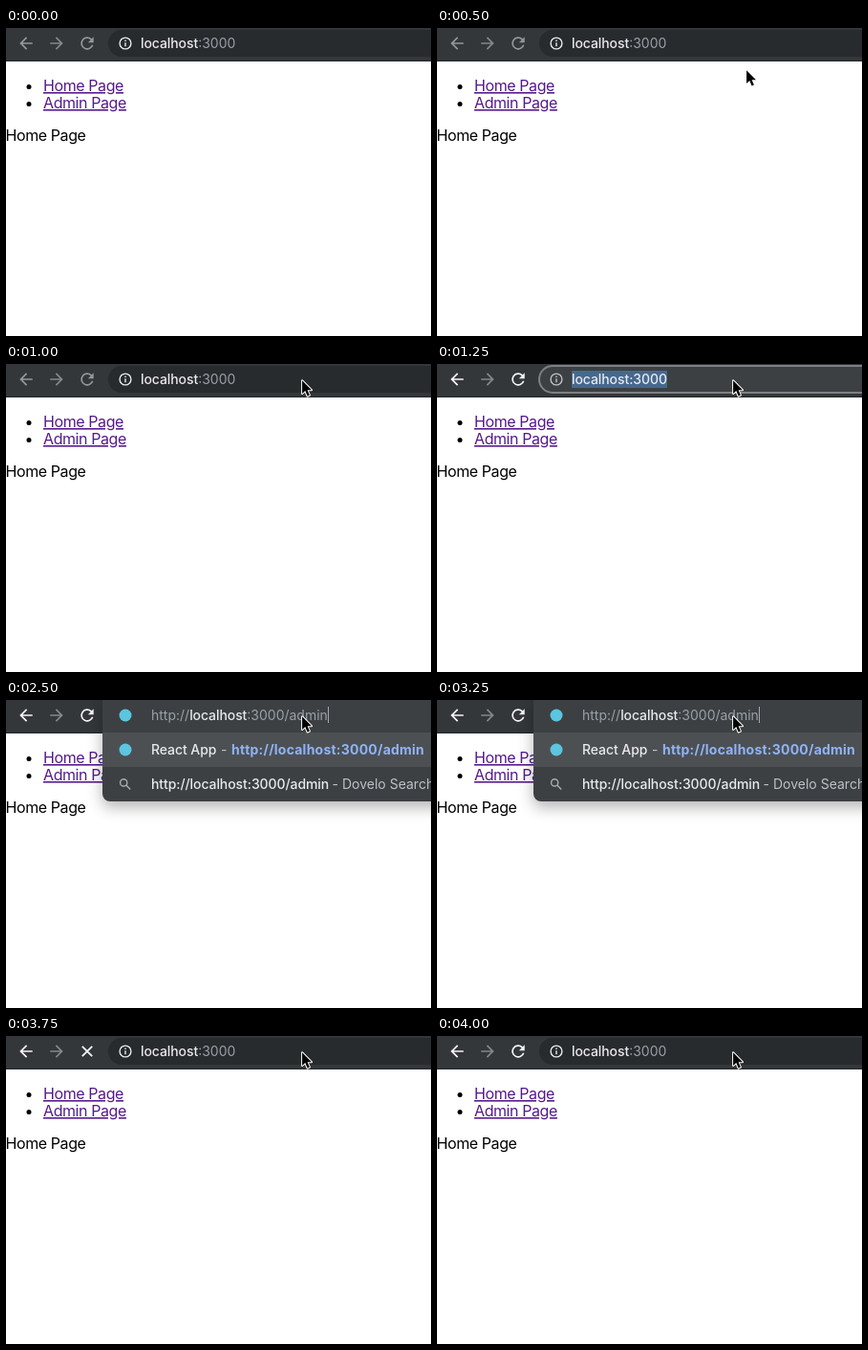
Animation, 445 px wide and 322 px high, one loop 5750 ms. Source, as an HTML page:

```html
<!DOCTYPE html>
<html lang="en">
<head>
<meta charset="utf-8">
<title>Address bar navigation</title>
<style>
  html, body { margin: 0; width: 100%; height: 100%; overflow: hidden; background: #fff; }
  .stage { position: relative; width: 100%; height: 100%; overflow: hidden; contain: strict; }
  svg { position: absolute; left: 0; top: 0; width: 445px; height: 322px; }
  text {
    font: 500 14px Inter, "Liberation Sans", sans-serif;
    letter-spacing: -0.08px;
    fill: #e8eaed;
    white-space: pre;
  }

  .page text { font-size: 16px; font-weight: 400; letter-spacing: -0.41px; fill: #000; }
  .page .link {
    fill: #551a8b;
    text-decoration: underline;
    text-decoration-thickness: 1px;
    text-underline-offset: 1px;
  }

  .icon { fill: currentColor; }
  .line { fill: none; stroke: currentColor; stroke-width: 1.4; }
  .white { fill: #e8eaed; font-weight: 500; letter-spacing: -0.08px; }
  .dim, .soft { font-weight: 400; letter-spacing: 0; }
  .dim { fill: #9aa0a6; }
  .soft { fill: #bdc1c6; }
  .match { font-weight: 700; letter-spacing: 0.23px; fill: #8fb3f7; }
  .favicon { fill: #5cc5e0; }

  .panel {
    position: absolute; left: 101px; top: -6px; width: 380px; height: 112px;
    border-radius: 8px; background: #3c4043;
    box-shadow: 0 6px 16px rgba(0, 0, 0, .3);
  }
  .panel div { position: absolute; top: 40px; width: 100%; height: 36px; background: #4d5053; }

  /* All state changes are hard cuts on a 250 ms beat, 23 beats per loop. */
  .nav, .reload, .stop, .rest, .focus, .open, .panel, .caret, .cursor {
    animation: 5750ms step-end infinite;
  }
  .nav { animation-name: nav; }
  .reload { animation-name: nav, reload; }
  .stop { animation-name: stop; }
  .rest { animation-name: rest; }
  .focus { animation-name: focus; }
  .open { animation-name: open; }
  .panel { animation-name: open, settle; }
  .caret { animation-name: caret; }
  .cursor { animation-name: cursor; }

  @keyframes nav {
    0% { color: #94969a; }
    21.739% { color: #f4f5f6; }
  }
  @keyframes reload {
    0% { visibility: visible; }
    65.217% { visibility: hidden; }
    69.565% { visibility: visible; }
  }
  @keyframes stop {
    0% { visibility: hidden; }
    65.217% { visibility: visible; }
    69.565% { visibility: hidden; }
  }
  @keyframes rest {
    0% { visibility: visible; }
    21.739% { visibility: hidden; }
    65.217% { visibility: visible; }
  }
  @keyframes focus {
    0% { visibility: hidden; }
    21.739% { visibility: visible; }
    39.13% { visibility: hidden; }
  }
  @keyframes open {
    0% { visibility: hidden; }
    39.13% { visibility: visible; }
    65.217% { visibility: hidden; }
  }
  @keyframes settle {
    0% { opacity: .9; }
    43.478% { opacity: 1; }
  }
  @keyframes caret {
    0% { visibility: hidden; }
    39.13% { visibility: visible; }
    47.826% { visibility: hidden; }
    56.521% { visibility: visible; }
    65.217% { visibility: hidden; }
  }
  @keyframes cursor {
    0% { visibility: hidden; transform: translate(344px, 94px); }
    4.347% { visibility: visible; transform: translate(344px, 94px); }
    8.695% { visibility: visible; transform: translate(323px, 43px); }
    13.043% { visibility: visible; transform: translate(316px, 31px); }
    17.391% { visibility: visible; transform: translate(309px, 16px); }
  }
</style>
</head>
<body>
<div class="stage">
<svg viewBox="0 0 445 322">
  <defs>
    <path id="arrow" d="M8 -1H-4.17L1.42 -6.59L0 -8L-8 0L0 8L1.41 6.59L-4.17 1H8Z"/>
    <g id="info">
      <circle cx="125" cy="16" r="5.9"/>
      <path d="M125 15.2V19.2M125 12.6V14"/>
    </g>
  </defs>

  <g class="page">
    <circle cx="24" cy="61.5" r="2.5"/>
    <circle cx="24" cy="79.5" r="2.5"/>
    <text class="link" x="39" y="66">Home Page</text>
    <text class="link" x="39" y="84">Admin Page</text>
    <text x="-0.5" y="118">Home Page</text>
  </g>

  <rect width="445" height="35" fill="#34373a"/>
  <rect y="34" width="445" height="1" fill="#25282a"/>
  <use class="icon nav" href="#arrow" transform="translate(21 16) scale(.84)"/>
  <use class="icon" color="#85878b" href="#arrow" transform="translate(53 16) scale(-.84 .84)"/>
  <path class="icon reload" transform="translate(85 16) scale(.84)"
        d="M5.65 -5.65A8 8 0 1 0 7.73 2H5.65A6 6 0 1 1 4.22 -4.22L1 -1H8V-8Z"/>
  <path class="line stop" color="#f4f5f6" style="stroke-width:1.8" d="M79.8 10.8L90.2 21.2M90.2 10.8L79.8 21.2"/>

  <g class="rest">
    <rect x="107" y="2" width="400" height="28" rx="14" fill="#282b2e"/>
    <use class="line" color="#e8eaed" href="#info"/>
    <text x="141" y="21">localhost<tspan class="dim">:3000</tspan></text>
  </g>

  <g class="focus">
    <rect x="107" y="2" width="400" height="28" rx="14" fill="#3c4043" stroke="#7d8084" stroke-width="2"/>
    <use class="line" color="#bdc1c6" href="#info"/>
    <rect x="141" y="7" width="100" height="18" fill="#46688f"/>
    <text x="141" y="21">localhost:3000</text>
  </g>
</svg>

<div class="panel"><div></div></div>

<svg viewBox="0 0 445 322">
  <g class="open">
    <circle class="favicon" cx="125" cy="16" r="6.5"/>
    <text class="dim" x="152" y="21">http://<tspan class="white">localhost</tspan>:3000/admin</text>

    <circle class="favicon" cx="125" cy="52" r="6.5"/>
    <text x="152" y="57">React App</text>
    <text class="soft" x="225" y="57">-</text>
    <text class="match" x="236" y="57">http://localhost:3000/admin</text>

    <g class="line" color="#a9adb2">
      <circle cx="123.2" cy="86.4" r="3.6"/>
      <path d="M125.8 89L130.2 93.4"/>
    </g>
    <text x="152" y="93">http://localhost:3000/admin</text>
    <text class="soft" x="341.5" y="93">-</text>
    <text class="soft" x="352" y="93">Dovelo Search</text>
  </g>
  <rect class="caret" x="337" y="7" width="1" height="17" fill="#a4a9ae"/>
  <path class="cursor" d="M1.1 1.3V15L4.3 12.1L6.6 17.6L8.9 16.6L6.6 11.3H11Z"
        stroke="#fff" stroke-width="2" stroke-linejoin="round" paint-order="stroke"/>
</svg>
</div>
</body>
</html>
```
